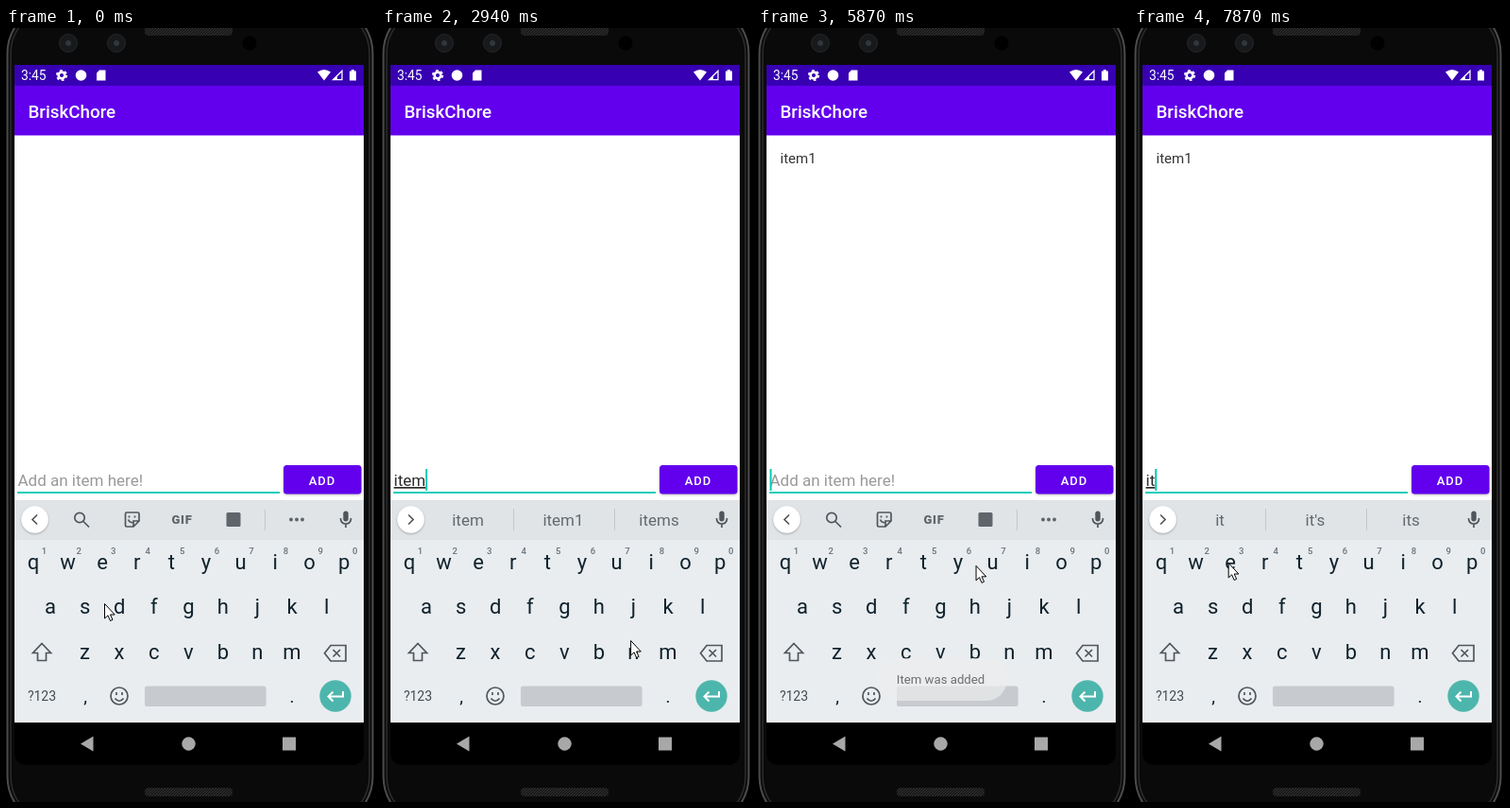
Animation, 392 px wide and 818 px high, one loop 8000 ms. Source, as an HTML page:

```html
<!DOCTYPE html>
<html lang="en">
<head>
<meta charset="utf-8">
<title>To-do app</title>
<style>
  html, body { margin: 0; width: 100%; height: 100%; overflow: hidden; background: #000; }
  svg { display: block; width: 392px; height: 818px; font-family: Roboto, sans-serif; }
  .mid { text-anchor: middle; }
  .line { fill: none; stroke: #50565b; stroke-width: 1.7; }
  .shadow { filter: drop-shadow(0 1px 1px #0004); }
</style>
</head>
<body>
<svg viewBox="0 0 392 818">
  <defs>
    <pattern id="mesh" width="3" height="3" patternUnits="userSpaceOnUse">
      <rect width="3" height="3" fill="#181818"/><path d="M0 3L3 0" stroke="#333"/>
    </pattern>
  </defs>

  <!-- Phone body -->
  <rect x="1.5" y="-25" width="387" height="868" rx="52" fill="#0a0a0a" stroke="#4c4c4c" stroke-width="2"/>
  <rect x="5" y="-21" width="380" height="860" rx="48" fill="none" stroke="#2c2c2c" stroke-width="1.5"/>
  <rect x="147" y="-4" width="93" height="12" rx="4" fill="url(#mesh)"/>
  <rect x="147" y="803" width="93" height="9" rx="4" fill="url(#mesh)"/>
  <g fill="#17191b" stroke="#24272a">
    <circle cx="66" cy="16" r="9.5"/><circle cx="117" cy="16" r="9.5"/>
  </g>
  <g fill="#30363c"><circle cx="66" cy="16" r="3"/><circle cx="117" cy="16" r="3"/></g>
  <circle cx="258" cy="16" r="7.5" fill="#000"/>

  <!-- Screen -->
  <rect x="9" y="700" width="370" height="79" rx="12" fill="#000"/>
  <rect x="9" y="113" width="370" height="386" fill="#fff"/>
  <rect x="9" y="39" width="370" height="22" fill="#3700b3"/>
  <rect x="9" y="61" width="370" height="52.500" fill="#6200ee"/>

  <!-- Status and title bars -->
  <g fill="#fff">
    <text x="16" y="55" font-size="13.8">3:45</text>
    <circle cx="59" cy="50" r="3.4" fill="none" stroke="#fff" stroke-width="2.6"/>
    <circle cx="59" cy="50" r="5.2" fill="none" stroke="#fff" stroke-width="1.8" stroke-dasharray="2.7 2.74"/>
    <circle cx="79.5" cy="50" r="5.8"/>
    <path d="M99 44.500H105.500V55.500H96V47.500Z"/>
    <path d="M330 46.500Q337 41.500 344 46.500L337 55.500Z"/>
    <path d="M346.500 54.700H356V45.200Z" fill="none" stroke="#fff" stroke-width="1.3"/>
    <path d="M346 55L351 50V55Z"/>
    <path d="M364 45.500H366V44H369V45.500H371V55.500H364Z"/>
    <text x="23.500" y="95" font-size="18.800" font-weight="500">BriskChore</text>
  </g>

  <text id="item" x="23.500" y="142.500" font-size="15" fill="#333"></text>

  <!-- Input row -->
  <path d="M12 491H290" stroke="#1bcdbc" stroke-width="2"/>
  <text id="hint" x="12.500" y="484" font-size="17" fill="#999">Add an item here!</text>
  <text id="input" x="12.500" y="484" font-size="17" fill="#2b2b2b" text-decoration="underline"></text>
  <rect id="caret" y="466" width="2" height="23" fill="#03cbb8"/>
  <rect id="button" class="shadow" x="294" y="462" width="82.500" height="30.500" rx="3.500"/>
  <text class="mid" x="335" y="482.500" font-size="13" font-weight="500" letter-spacing="1" fill="#fff">ADD</text>

  <!-- Keyboard -->
  <rect x="9" y="499" width="370" height="235" fill="#e9edf0"/>
  <rect x="9" y="499" width="370" height="42" fill="#e0e4e7"/>
  <circle class="shadow" cx="30.500" cy="519.500" r="14.300" fill="#fff"/>
  <path id="chevron" class="line"/>
  <g id="tools" fill="#5f666b">
    <circle class="line" cx="78" cy="517.500" r="5.200"/><path class="line" d="M82 521.500L88 527.500"/>
    <path class="line" d="M128 512H139.500Q141 512 141 513.500V521L135 527H128Q126.500 527 126.500 525.500V513.500Q126.500 512 128 512ZM135 527V521H141M129.500 519.500Q131 523 134 522.500M130.500 515.500V517.500M136.500 515.500V517.500"/>
    <text class="mid" x="186.500" y="524" font-size="13" font-weight="900" letter-spacing=".7">GIF</text>
    <rect x="233.500" y="512" width="15" height="15" rx="1.500"/>
    <path d="M274.500 509V531" stroke="#c3c8cb"/>
    <circle cx="302" cy="519.500" r="2"/><circle cx="308" cy="519.500" r="2"/><circle cx="314" cy="519.500" r="2"/>
  </g>
  <g id="words" class="mid" font-size="17">
    <path id="dividers" d="M139.500 508V531M246.500 508V531" stroke="#c3c8cb"/>
    <text x="91" y="526"></text><text x="192" y="526"></text><text x="293.500" y="526"></text>
  </g>
  <rect x="357.300" y="510.500" width="5.400" height="11" rx="2.700" fill="#50565b"/>
  <path class="line" d="M354.500 518Q354.500 524 360 524T365.500 518M360 524V528"/>
  <g id="keys" class="mid" fill="#10222c" font-size="22"></g>
  <path class="line" d="M38 650.500L47.500 660.500H42.500V668.500H33.500V660.500H28.500Z"/>
  <path class="line" d="M344 652.500H360V669H344L337.500 660.700ZM346.500 657L354 664.500M354 657L346.500 664.500"/>
  <text class="mid" x="38" y="711" font-size="14" fill="#444b50">?123</text>
  <circle class="line" cx="120" cy="706" r="9"/>
  <path class="line" d="M115.500 708.500Q120 714 124.500 708.500M117 702V705M123 702V705"/>
  <rect x="147" y="695.500" width="128.500" height="21.500" rx="2" fill="#c7cbcf"/>
  <circle cx="349" cy="706" r="16.700" fill="#4db6ac"/>
  <path d="M357 701V706.500H342M346.500 701.500L341.500 706.500L346.500 711.500" fill="none" stroke="#fff" stroke-width="2"/>

  <!-- Navigation bar -->
  <rect x="9" y="734" width="370" height="20" fill="#000"/>
  <g fill="#a8a8a8">
    <path d="M92.500 748.500V764.500L79 756.500Z"/><circle cx="193.500" cy="756.500" r="7.200"/>
    <rect x="293" y="749.500" width="14" height="14"/>
  </g>

  <g id="popup" class="mid" fill="#2b3a42">
    <rect class="shadow" x="-18" width="36" height="106" rx="3.500" fill="#ced3d6"/>
    <rect id="held" x="-18" width="36" height="47" rx="3.500" fill="#4db6ac"/>
    <text id="letter" y="36" font-size="25"></text>
    <text id="more" x="9" y="48" font-size="12">...</text>
  </g>
  <g id="toast">
    <rect x="126" y="666" width="138" height="45" rx="22.500" fill="#eee"/>
    <text class="mid" x="193.500" y="693" font-size="13.200" fill="#333">Item was added</text>
  </g>
  <path id="cursor" d="M.5 .5V16L4 12.800L6.500 18.500L9 17.400L6.500 12H11.200Z" fill="#fff" stroke="#000"/>
</svg>

<script>
const $ = id => document.getElementById(id);
const LOOP = 8000, TRAVEL = 380, TAP = 120, LONG_PRESS = 240, BLINK = 500;

const keyAt = {};
function addKey(text, x, y, attrs = '') {
  $('keys').insertAdjacentHTML('beforeend', `<text x="${x}" y="${y}" ${attrs}>${text}</text>`);
}
[['qwertyuiop', 29, 572], ['asdfghjkl', 47, 619], ['zxcvbnm', 83.5, 667]].forEach(([row, left, y], r) => {
  [...row].forEach((char, i) => {
    const x = left + i * 36.58;
    keyAt[char] = [x, y];
    addKey(char, x, y);
    if (!r) addKey((i + 1) % 10, x + 11.5, 556, 'font-size="9.5" font-weight="500" fill="#697177"');
  });
});
addKey(',', 84, 713, 'font-size="19"');
addKey('.', 303, 713, 'font-size="19"');

// The pointer sets off for each tap as soon as the previous one is released.
const taps = [
  { press: -TAP, at: [104, 608] },
  { key: 'i', press: 880 },
  { key: 't', press: 1470 },
  { key: 'e', press: 2160 },
  { key: 'm', press: 2730 },
  { key: 'q', press: 4050, hold: 710, types: '1', at: [42, 570] },
  { key: 'ADD', press: 5480, at: [317, 487] },
  { press: 6020, at: [209, 588] },
  { key: 'i', press: 6800 },
  { key: 't', press: 7370 },
  { key: 'e', press: LOOP },
].map(tap => {
  const [x, y] = keyAt[tap.key] || [];
  return { at: [x - 2.5, y - 7], types: tap.key || '', release: tap.press + (tap.hold || TAP), ...tap };
});
const added = taps.find(tap => tap.key === 'ADD').release;

const SUGGESTIONS = {
  i: ['i', 'I', 'ii'], it: ['it', "it's", 'its'], ite: ['ite', 'item', 'items'],
  item: ['item', 'item1', 'items'], item1: ['', 'item1', ''],
};

const clamp = v => Math.max(0, Math.min(1, v));
const smooth = v => v * v * (3 - 2 * v);
const show = (id, on) => $(id).style.display = on ? '' : 'none';
const typedBy = t => taps.filter(tap => tap.release <= t)
  .reduce((text, tap) => tap.key === 'ADD' ? '' : text + tap.types, '');

function drawInput(t) {
  const text = typedBy(t);
  const lastEdit = taps.findLast(tap => tap.key && tap.release <= t)?.release ?? -BLINK;
  $('input').textContent = text;
  $('caret').setAttribute('x', 12.5 + (text ? $('input').getComputedTextLength() : 0));
  show('hint', !text);
  show('caret', Math.floor((t - lastEdit) / BLINK) % 2 === 0);
}

function drawStrip(t) {
  const words = SUGGESTIONS[typedBy(t - 60)];
  show('tools', !words);
  show('words', words);
  show('dividers', words?.[0]);
  $('chevron').setAttribute('d', words ? 'M28 514.5L33 519.5L28 524.5' : 'M33 514.5L28 519.5L33 524.5');
  document.querySelectorAll('#words text').forEach((node, i) => {
    const word = words?.[i] || '', strong = word === 'I';
    node.textContent = word;
    node.setAttribute('font-weight', strong ? 700 : 400);
    node.setAttribute('fill', strong ? '#111' : '#62696e');
  });
}

function drawPress(t) {
  const tap = taps.find(({ press, release }) => t >= press && t < release);
  const spot = keyAt[tap?.key];
  $('button').setAttribute('fill', tap?.key === 'ADD' ? '#7d2cf2' : '#6200ee');
  show('popup', spot);
  if (!spot) return;
  const held = t - tap.press >= LONG_PRESS;
  $('popup').setAttribute('transform', `translate(${spot[0]} ${spot[1] - 93})`);
  $('letter').textContent = held ? tap.types : tap.key;
  $('letter').setAttribute('fill', held ? '#fff' : '#2b3a42');
  show('held', held);
  show('more', !held);
}

function drawCursor(t) {
  const i = taps.findLastIndex(tap => tap.release <= t);
  const from = taps[i], to = taps[i + 1];
  const k = smooth(clamp((t - from.release) / TRAVEL));
  $('cursor').setAttribute('transform', `translate(${from.at.map((v, axis) => v + (to.at[axis] - v) * k)})`);
}

function draw(now) {
  const t = now % LOOP;
  drawInput(t);
  drawStrip(t);
  drawPress(t);
  drawCursor(t);
  $('item').textContent = t >= added ? typedBy(added - 1) : '';
  $('toast').style.opacity = Math.min(clamp((t - added) / 400), clamp((added + 2270 - t) / 350));
  requestAnimationFrame(draw);
}
requestAnimationFrame(draw);
</script>
</body>
</html>
```
